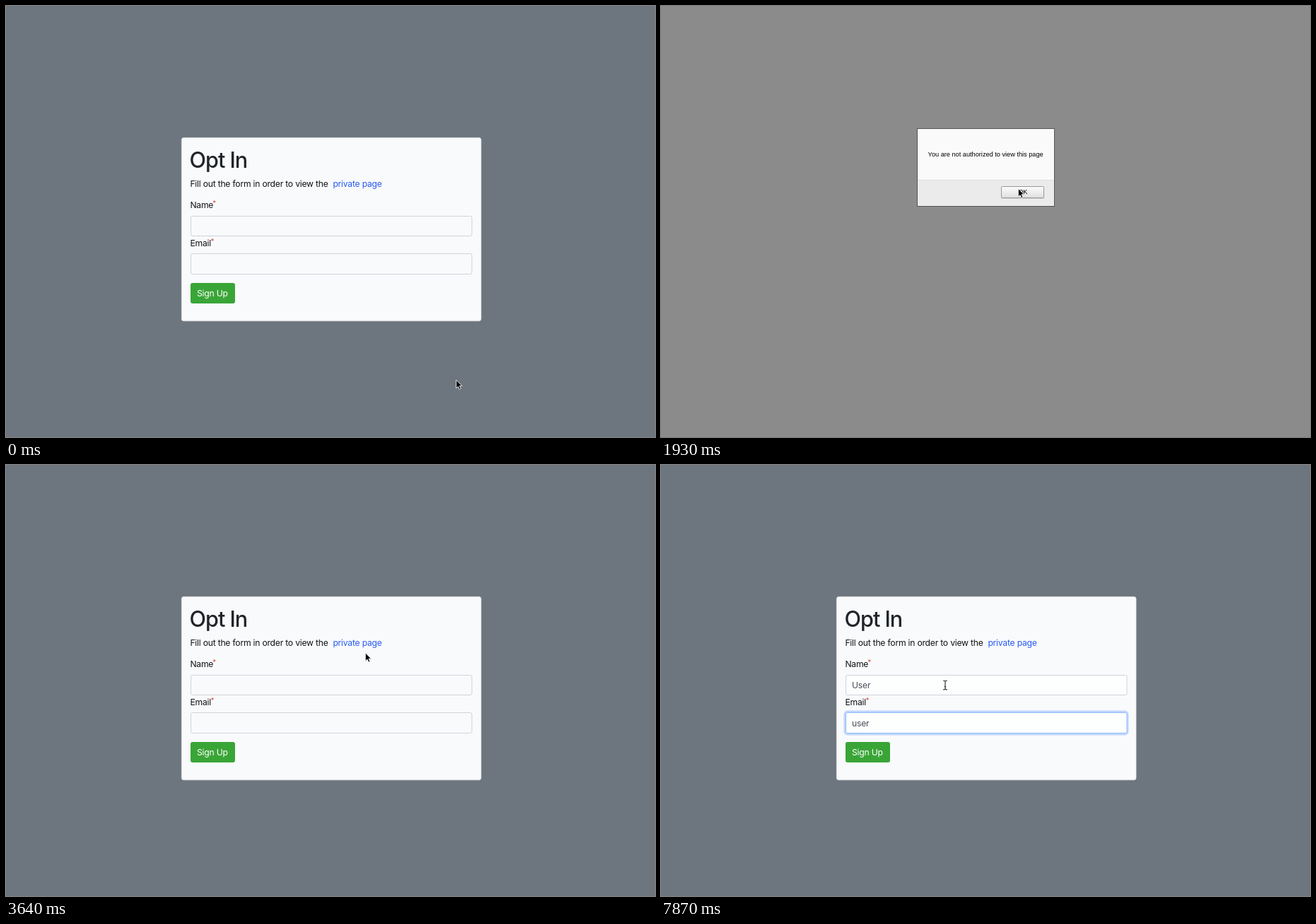
An HTML page for the animation above (8000 ms loop, 918 by 610 pixels).

```html
<!DOCTYPE html>
<html lang="en">
<head>
<meta charset="utf-8">
<title>Opt in form</title>
<style>
  html, body { margin: 0; width: 100%; height: 100%; overflow: hidden; background: #fefefe; }
  svg { display: block; width: 918px; height: 610px; }
  text { white-space: pre; }
  #form { font: 12.2px Inter, "Open Sans", sans-serif; letter-spacing: -.24px; font-optical-sizing: none; fill: #101316; }
  #form .title { font-size: 30.6px; font-weight: 500; letter-spacing: -1px; fill: #212529; }
  #form .star { font-size: 9.2px; fill: #d03a30; }
  #form .value { fill: #495057; }
  #link { fill: #2a5bf2; }
  #link.hover { fill: #1d47b8; text-decoration: underline; }
  #dialog { font: 9.2px "Liberation Sans", Arial, sans-serif; fill: #000; }
  .glow { fill: none; stroke: #bfd6fe; stroke-width: 2.6; }
  .caret { fill: #41474d; }
</style>
</head>
<body>
<svg viewBox="0 0 918 610">
  <defs>
    <linearGradient id="up" x2="0" y2="1"><stop stop-color="#fdfdfd"/><stop offset="1" stop-color="#dedede"/></linearGradient>
    <linearGradient id="down" x2="0" y2="1"><stop stop-color="#b0b0b0"/><stop offset="1" stop-color="#bebebe"/></linearGradient>
  </defs>

  <g id="form">
    <rect width="918" height="610" fill="#6d757e"/>
    <rect x="248.4" y="186.4" width="423.6" height="259.4" rx="3" fill="#f9fafc" stroke="#dfe1e4" stroke-width=".8"/>
    <text class="title" x="259.6" y="229">Opt In</text>
    <text x="260.4" y="255.7">Fill out the form in order to view the</text>
    <text id="link" x="462.4" y="255.7">private page</text>
    <rect id="outline" x="462.5" y="244.5" width="70" height="15" fill="none" stroke="#2a5bf2" stroke-dasharray="1 1"/>
    <text x="260.4" y="286.4">Name</text>
    <text class="star" x="292.6" y="282">*</text>
    <text x="260.4" y="339.9">Email</text>
    <text class="star" x="289.8" y="335.5">*</text>
    <g id="fields"></g>
    <rect x="261" y="392" width="63" height="29" rx="3" fill="#3aa537"/>
    <text x="270" y="411" fill="#fff">Sign Up</text>
  </g>

  <g id="dialog">
    <rect width="918" height="610" fill="#8b8b8b"/>
    <rect x="362.5" y="173.5" width="194" height="110" fill="#fafafa"/>
    <rect x="363" y="246" width="193" height="37" fill="#ebebeb"/>
    <rect x="363" y="246" width="193" height="1" fill="#dedede"/>
    <rect x="362.5" y="173.5" width="194" height="110" fill="none" stroke="#555"/>
    <text x="377.6" y="213">You are not authorized to view this page</text>
    <rect x="481" y="257" width="61" height="16" rx="1" fill="#000" opacity=".12"/>
    <rect id="ok" x="481.5" y="255.5" width="60" height="16" rx="1" stroke="#989898"/>
    <text x="505.2" y="266.4">OK</text>
  </g>

  <g id="arrow">
    <path d="M.5 1.6V13L3.3 10.6 5.1 14.6 7.3 13.6 5.5 9.8H9z" fill="#000" opacity=".18"/>
    <path d="M.3.3V12L3 9.6 4.8 13.6 6.9 12.7 5.1 8.7H8.6z" fill="#000" stroke="#fff" stroke-width=".9"/>
  </g>
  <g id="hand">
    <path d="M-1 .8Q0-.6 1 .8V5Q2.4 4.2 3 5.3 4.4 4.6 5 5.9 6.6 5.4 6.8 7V9.6Q6.8 11.4 5.6 12.6V14H-.8V12.8L-4.2 8.4Q-4.4 6.6-2.6 7.2L-1 8.6z"
      fill="#fff" stroke="#000" stroke-width=".9" stroke-linejoin="round"/>
    <path d="M1 9.4v2.6M2.8 9.4v2.6M4.5 9.4v2.6" stroke="#000" stroke-width=".6"/>
  </g>
  <path id="beam" d="M-2.8-6.3H-1.4L0-5.4 1.4-6.3H2.8M0-5.4V5.6M-2.8 6.4H-1.4L0 5.6 1.4 6.4H2.8M-1.3 2.3H1.3"
    fill="none" stroke="#222" stroke-width="1.1"/>
</svg>

<script>
const LOOP = 8000;
const $ = id => document.getElementById(id);
const show = (el, on) => { el.style.display = on ? "" : "none"; };

// Start times in ms; a track holds each value until its next row.
const scenes = [[0, "form"], [1780, ""], [1930, "dialog"], [3490, ""], [3640, "form"]];
const pointer = [
  [0, "arrow", 636.5, 529], [600, "arrow", 618, 482], [750, "arrow", 561, 366],
  [900, "arrow", 515, 277], [1040, "hand", 506, 250], [1780, "arrow", 505, 255.5],
  [1930, "arrow", 505, 258], [2110, "arrow", 505, 262], [2590, "arrow", 506.5, 264],
  [2740, "arrow", 508, 265.5], [3820, "arrow", 492, 275], [3970, "arrow", 446, 293],
  [4130, "beam", 408, 309], [4290, "beam", 402, 311.5]
];
const linkState = [[0, ""], [1040, "hover"], [1640, "press"], [1780, ""]];
const okDown = [[0, false], [3340, true]];

function typed(start, word) {
  return [[0, ""], ...[...word].map((_, i) => [start + i * 150, word.slice(0, i + 1)])];
}

const fieldSpecs = [
  { y: 297.5, h: 28, base: 316, text: typed(5940, "User"),
    focus: [[0, 0], [4440, 1], [6540, .5], [6690, 0]],
    used: [[0, false], [4440, true]],
    caret: [[0, false], [4440, true], [4890, false], [5340, true], [5940, false]] },
  { y: 350.5, h: 29, base: 369.6, text: typed(7420, "user"),
    focus: [[0, 0], [6540, .5], [6690, 1]],
    used: [[0, false], [6540, true]],
    caret: [[0, false], [6830, true], [7270, false]] }
];

const at = (track, t) => track.findLast(row => row[0] <= t);
const valueAt = (track, t) => at(track, t)[1];

function make(parent, tag, attrs) {
  const el = document.createElementNS("http://www.w3.org/2000/svg", tag);
  for (const key in attrs) el.setAttribute(key, attrs[key]);
  return parent.appendChild(el);
}

const fields = fieldSpecs.map(spec => {
  const { y, h, base } = spec, box = $("fields");
  return {
    ...spec,
    glow: make(box, "rect", { class: "glow", x: 259.8, y: y - 1.6, width: 400.4, height: h + 3.2, rx: 4 }),
    frame: make(box, "rect", { x: 261.5, y, width: 397.5, height: h, rx: 2.5 }),
    label: make(box, "text", { class: "value", x: 270, y: base }),
    bar: make(box, "rect", { class: "caret", x: 270.6, y: y + 6.7, width: 1, height: 15 })
  };
});

function drawField(f, t) {
  const focus = valueAt(f.focus, t);
  f.glow.style.opacity = focus;
  f.frame.style.fill = valueAt(f.used, t) ? "#fdfefe" : "#f9fafc";
  f.frame.style.stroke = focus ? "#8fbafb" : "#cfd4d9";
  f.label.textContent = valueAt(f.text, t);
  show(f.bar, valueAt(f.caret, t));
}

function draw(t) {
  const scene = valueAt(scenes, t);
  for (const id of ["form", "dialog"]) show($(id), id === scene);

  const state = valueAt(linkState, t);
  $("link").setAttribute("class", state ? "hover" : "");
  show($("outline"), state === "press");
  $("ok").setAttribute("fill", valueAt(okDown, t) ? "url(#down)" : "url(#up)");
  fields.forEach(f => drawField(f, t));

  const [, kind, x, y] = at(pointer, t);
  for (const id of ["arrow", "hand", "beam"]) show($(id), id === kind);
  $(kind).setAttribute("transform", `translate(${x} ${y})`);
}

const start = performance.now();
function tick() {
  draw((performance.now() - start) % LOOP);
  requestAnimationFrame(tick);
}
tick();
</script>
</body>
</html>
```
